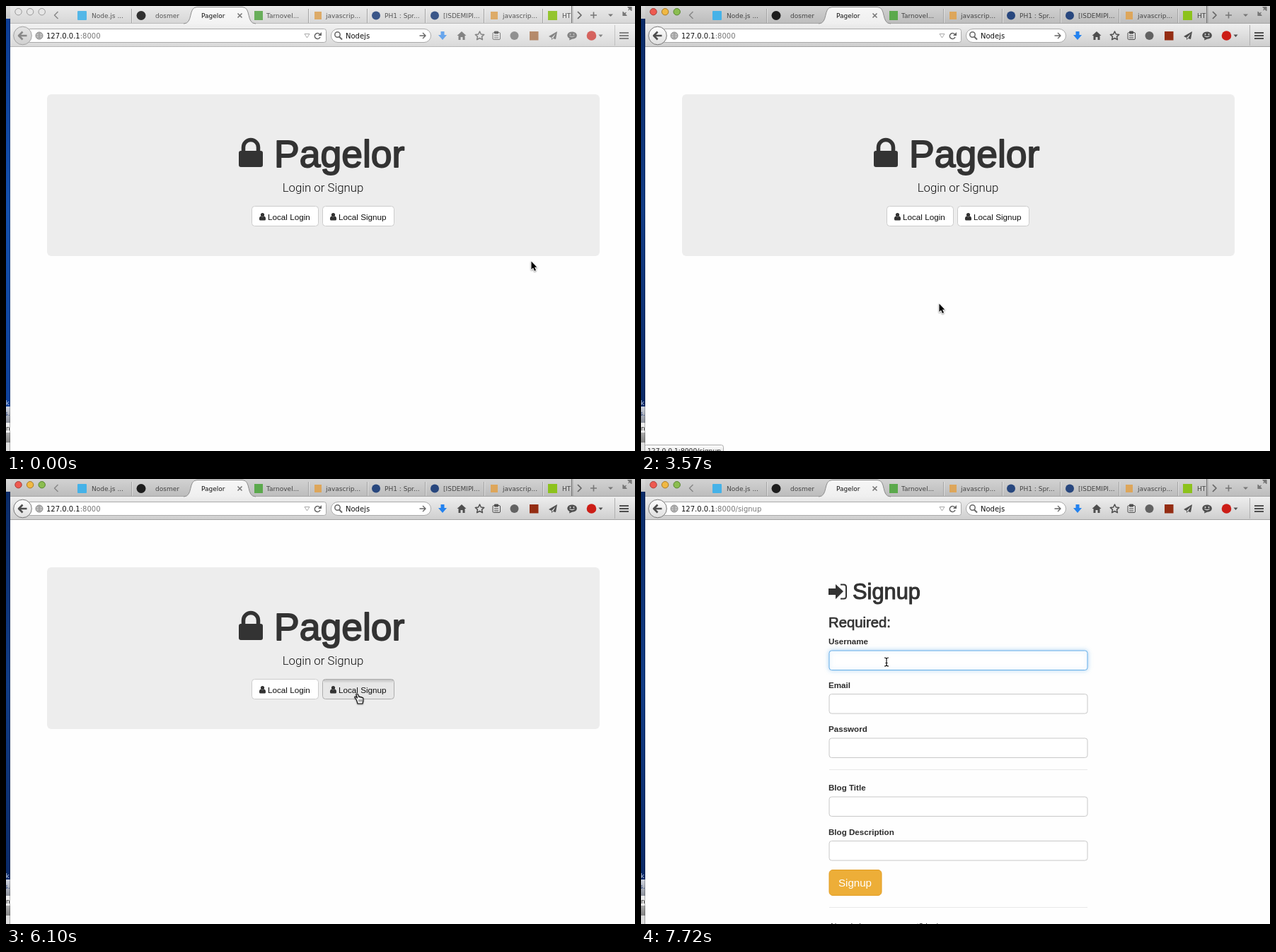
Animation of 889 by 630 pixels, one loop 8 s. Source, as an HTML page with a canvas:

```html
<!DOCTYPE html>
<html lang="en">
<head>
<meta charset="utf-8">
<title>Signup walkthrough</title>
<style>
html, body { margin: 0; width: 100%; height: 100%; overflow: hidden; background: #fefefe; }
canvas { display: block; }
</style>
</head>
<body>
<canvas id="stage" width="889" height="630"></canvas>
<script>
const ctx = document.getElementById('stage').getContext('2d');
const LOOP = 8000;
const UI = '"DejaVu Sans", sans-serif';
const PAGE = '"Liberation Sans", Arial, sans-serif';

// Pointer stops: time, x, y, shape
const POINTER = [
  [0, 742, 361, 'arrow'], [300, 655, 338, 'arrow'], [445, 462, 299, 'arrow'], [590, 401, 294, 'arrow'],
  [1040, 402, 295, 'hand'], [1340, 426, 297, 'hand'], [1480, 476, 300, 'hand'], [1630, 508, 301, 'hand'],
  [3570, 421, 421, 'arrow'], [3720, 410, 452, 'arrow'], [3870, 404, 470, 'arrow'], [4020, 402, 477, 'arrow'],
  [5210, 402, 475, 'arrow'], [5360, 406, 462, 'arrow'], [5500, 421, 428, 'arrow'], [5650, 452, 374, 'arrow'],
  [5800, 484, 328, 'arrow'], [5950, 497, 304, 'hand'], [6240, 496, 303, 'arrow'],
  [6690, 478, 296, 'arrow'], [6840, 428, 278, 'arrow'], [6990, 365, 262, 'beam'], [7130, 347, 259, 'beam']
];

const within = (t, from, to) => t >= from && t < to;

function text(str, x, y, font, color = '#333', align = 'left') {
  ctx.font = font;
  ctx.fillStyle = color;
  ctx.textAlign = align;
  ctx.fillText(str, x, y);
}

// Medium weight: regular letters with a thin outline
function heading(str, x, y, size) {
  text(str, x, y, size + 'px ' + PAGE, '#333');
  ctx.strokeStyle = '#333';
  ctx.lineWidth = size * .034;
  ctx.lineJoin = 'round';
  ctx.strokeText(str, x, y);
}

function rect(x, y, w, h, fill) {
  ctx.fillStyle = fill;
  ctx.fillRect(x, y, w, h);
}

function box(x, y, w, h, r, fill, stroke) {
  ctx.beginPath();
  ctx.roundRect(x, y, w, h, r);
  paint(fill, stroke);
}

function disc(x, y, r, fill, stroke, width) {
  ctx.beginPath();
  ctx.arc(x, y, r, 0, 7);
  paint(fill, stroke, width);
}

function paint(fill, stroke, width = 1) {
  if (fill) { ctx.fillStyle = fill; ctx.fill(); }
  if (stroke) { ctx.strokeStyle = stroke; ctx.lineWidth = width; ctx.stroke(); }
}

function shape(d, x, y, fill, stroke, width = 1) {
  const path = new Path2D(d);
  ctx.save();
  ctx.translate(x, y);
  if (fill) { ctx.fillStyle = fill; ctx.fill(path); }
  if (stroke) { ctx.strokeStyle = stroke; ctx.lineWidth = width; ctx.stroke(path); }
  ctx.restore();
}

function fade(y0, y1, ...colors) {
  const g = ctx.createLinearGradient(0, y0, 0, y1);
  colors.forEach((c, i) => g.addColorStop(i / (colors.length - 1), c));
  return g;
}

function desktop(active) {
  rect(0, 0, 6, 630, active ? fade(20, 560, '#0a2b68', '#113c86', '#0a2a68') : fade(20, 560, '#0b3c94', '#1450ad', '#0d409a'));
  rect(0, 0, 6, 18, fade(0, 18, '#dadada', '#c6c6c6'));
  rect(0, 567, 6, 23, fade(567, 590, '#cfd4df', '#8d929c'));
  rect(0, 590, 6, 14, '#eeeeee');
  rect(0, 604, 6, 14, fade(604, 618, '#aaaaaa', '#858585'));
  rect(0, 618, 6, 12, '#dedede');
  ctx.save();
  ctx.beginPath();
  ctx.rect(0, 550, 6, 60);
  ctx.clip();
  text('ok', -6, 565, '9px ' + UI, '#c5d0e6');
  text('s.', -2, 580, '9px ' + UI, '#223b77');
  text('n', 0, 601, '9px ' + UI, '#222');
  ctx.restore();
  rect(5, 18, 1, 612, 'rgba(0,0,0,.25)');
}

function tabs(active) {
  rect(6, 0, 883, 25, active ? fade(0, 25, '#d2d2d2', '#bcbcbc') : fade(0, 25, '#e9e9e9', '#d6d6d6'));
  const lights = active ? ['#ee5a50', '#f0b843', '#8bbd50'] : ['#e6e6e6', '#e6e6e6', '#e6e6e6'];
  const rims = active ? ['#a83c36', '#a87a26', '#55842c'] : ['#999', '#999', '#999'];
  lights.forEach((c, i) => disc(17.5 + i * 16.6, 8.2, 4.7, c, rims[i]));
  const ink = active ? '#444' : '#555';
  shape('M3 -5L-2 0L3 5', 70.5, 13, null, '#888', 1.5);
  for (const x of [177, 427, 510, 592, 675, 758]) {
    rect(x, 4, 1, 20, '#a4a4a4');
    rect(x + 1, 4, 1, 20, 'rgba(255,255,255,.45)');
  }

  ctx.globalAlpha = active ? 1 : .9;
  box(101, 7, 13, 13, 1, '#45b2e8');
  disc(191, 13.5, 6.5, '#1d1d1d');
  box(351, 7, 12, 13, 0, '#5ba94c');
  box(436, 8, 10, 11, 0, '#dda65b');
  disc(523, 13.5, 6, '#28477e');
  disc(606, 13.5, 6, '#28477e');
  box(685, 8, 10, 11, 0, '#dda65b');
  box(766, 7, 13, 13, 0, '#8cc21c');
  ctx.globalAlpha = 1;

  const label = (s, x) => text(s, x, 16.5, '9px ' + UI, ink);
  label('Node.js ...', 121);
  label('dosmer', 211);
  label('Tarnovel...', 368);
  label('javascrip...', 452);
  label('PH1 : Spr...', 535);
  label('[ISDEMIPI...', 618);
  label('javascrip...', 702);
  ctx.save();
  ctx.beginPath();
  ctx.rect(780, 0, 19, 25);
  ctx.clip();
  label('HTML', 786);
  ctx.restore();
  rect(799, 0, 1, 24, '#777');
  rect(800, 0, 2, 24, 'rgba(0,0,0,.1)');
  shape('M-2.5 -5L2.5 0L-2.5 5', 810.5, 13, null, '#666', 1.7);
  shape('M-4.5 0H4.5M0 -4.5V4.5', 830.5, 13, null, '#777', 1.6);
  shape('M-3.5 -1.5H3.5L0 2Z', 854.5, 13, '#777');
  shape('M7 0H12V5ZM0 7V12H5ZM7.5 4.5L10 2M2 10L4.5 7.5', 872, 1.5, '#777', '#777', 1.2);
}

function toolbar(active, url) {
  rect(6, 24, 883, 34, active ? fade(24, 57, '#efefef', '#cfcfcf') : fade(24, 57, '#f2f2f2', '#dadada'));
  rect(6, 24, 883, 1, active ? '#a5a5a5' : '#bbbbbb');
  rect(6, 57, 883, 1, active ? '#a2a2a2' : '#b8b8b8');
  shape('M251 25C265 25 257 1.5 270 1.5H334C347 1.5 339 25 353 25', 0, 0,
    active ? fade(0, 25, '#f7f7f7', '#efefef') : fade(0, 25, '#fafafa', '#f2f2f2'), '#8c8c8c');
  text('Pagelor', 276, 16.5, '9px ' + UI, '#111');
  shape('M-3 -3L3 3M3 -3L-3 3', 330.5, 13.5, null, '#777', 1.6);

  box(30.5, 32.5, 422, 19, 3, '#fff', '#aaa');
  disc(23.5, 42, 12.8, active ? fade(29, 55, '#fff', '#dedede') : fade(29, 55, '#e4e4e4', '#d0d0d0'), active ? '#777' : '#a2a2a2');
  shape('M6 0H-5M0 -5.5L-5.5 0L0 5.5', 23.5, 42, null, active ? '#4d4d4d' : '#888', 2.6);
  disc(47, 42, 5, '#c5c5c5', '#888');
  shape('M-5 0H5M0 -5V5M-3.5 -3.5Q0 -1 3.5 -3.5M-3.5 3.5Q0 1 3.5 3.5', 47, 42, null, '#8b8b8b', .7);
  text('127.0.0.1', 57, 45.5, '10px ' + UI, '#111');
  const host = ctx.measureText('127.0.0.1').width;
  text(':8000' + url, 57 + host, 45.5, '10px ' + UI, '#777');
  shape('M-3.5 -2.5H3.5L0 3Z', 425.5, 42, null, '#aaa');
  shape('M3.5 -1A4 4 0 1 0 3.5 2', 440.5, 42, null, '#666', 1.5);
  shape('M5.5 -5V0H.5Z', 440.5, 42, '#666');

  box(459.5, 32.5, 141, 19, 9.5, '#fff', '#aaa');
  disc(468.5, 40.5, 3.7, null, '#666', 1.5);
  shape('M0 0L4 4', 471, 43.5, null, '#666', 2);
  text('Nodejs', 480, 45.5, '10px ' + UI, '#111');
  shape('M-4.5 0H4M0 -4L4 0L0 4', 589, 42, null, '#666', 1.4);

  ctx.globalAlpha = active ? 1 : .65;
  const ink = '#4e4e4e';
  shape('M-2.5 -6H2.5V-1H6L0 6L-6 -1H-2.5Z', 617, 42, '#2382ef');
  shape('M-6.5 0L0 -6L6.5 0H4.5V6H1.5V2H-1.5V6H-4.5V0Z', 644, 42, ink);
  shape('M0 -6L1.9 -2L6.2 -1.6L3 1.4L3.9 5.7L0 3.5L-3.9 5.7L-3 1.4L-6.2 -1.6L-1.9 -2Z', 669.5, 42, null, ink, 1.5);
  box(688, 37.5, 10.5, 10, 1.5, null, ink);
  shape('M-2.5 -6H2.5V-3H-2.5ZM-3 0H3M-3 3H3', 693, 42, ink, ink);
  disc(718.5, 42, 6, '#626262');
  box(740, 36, 12.5, 12.5, 0, active ? '#942d13' : '#9c5b2c');
  shape('M6 -6L-6 1L-2 3L4 -3L0 4L4 5ZM-2 3V6L0 4Z', 773, 42, ink);
  shape('M0 -5.5C9 -5.5 9 4.5 1 4.5L-4 6.5L-3.5 4C-9 1 -7 -5.5 0 -5.5Z', 800, 42, ink);
  disc(797.5, 40, .9, '#eee');
  disc(802.5, 40, .9, '#eee');
  shape('M-3.5 1.5Q0 4 3.5 1.5', 800, 41, null, '#eee');
  disc(827.5, 42, 6.8, '#cc1d16');
  shape('M-3 -1.5H3L0 2Z', 840.5, 42, ink);
  rect(860, 27, 1, 29, '#b0b0b0');
  for (const y of [37, 41, 45]) rect(867, y, 13, 2, ink);
  ctx.globalAlpha = 1;
}

function personButton(x, w, label, state) {
  const hot = state !== 'idle';
  box(x + .5, 283.5, w, 28, 4, hot ? '#e7e7e7' : '#fff', hot ? '#adadad' : '#ccc');
  if (state === 'pressed') {
    rect(x + 2, 284, w - 3, 5, fade(284, 289, 'rgba(0,0,0,.16)', 'rgba(0,0,0,0)'));
  }
  disc(x + 15.5, 295.7, 2.6, '#333');
  shape('M-4.5 4.5C-4.7 1 -3.5 0 -2.2 0Q0 1.6 2.2 0C3.5 0 4.7 1 4.5 4.5Q4.3 5.8 3 5.8H-3Q-4.3 5.8 -4.5 4.5Z', x + 15.5, 297.8, '#333');
  text(label, x + 23, 302.5, '11.7px ' + PAGE, '#111');
}

function welcome(t) {
  box(58, 125, 781, 229, 6, '#ededed');
  box(329, 205, 34, 23, 3, '#333');
  shape('M335.5 207V200A10.5 10.5 0 0 1 356.5 200V207', 0, 0, null, '#333', 5.5);
  heading('Pagelor', 379, 228, 53.5);
  text('Login or Signup', 448, 262.5, '300 16.8px Roboto, sans-serif', '#111', 'center');

  const login = within(t, 1040, 1480) ? 'hover' : 'idle';
  const signup = within(t, 6100, 6240) ? 'pressed'
    : within(t, 1480, 3570) || within(t, 5950, 6100) ? 'hover' : 'idle';
  personButton(347, 94, 'Local Login', login);
  personButton(447, 101, 'Local Signup', signup);

  if (within(t, 1040, 3720)) {
    const link = t < 1480 ? 'login' : 'signup';
    box(4.5, 621.5, link === 'login' ? 103 : 112, 14, 3, fade(621, 634, '#fff', '#e0e0e0'), '#aaa');
    text('127.0.0.1:8000/' + link, 9, 632.5, '9.2px ' + UI, '#222');
  }
}

function field(label, y, focus = 0) {
  text(label, 265, y - 8.5, 'bold 11.6px ' + PAGE, '#2b2b2b');
  ctx.save();
  if (focus) {
    ctx.shadowColor = `rgba(102,175,233,${.5 * focus})`;
    ctx.shadowBlur = 6;
  }
  box(266, y + .5, 365, 27.5, 3.5, '#fff', focus ? '#66afe9' : '#c8c8c8');
  ctx.restore();
}

function signupForm(t) {
  shape('M265 155H275V149L286 159L275 170V164H265Z', 0, 0, '#333');
  shape('M282 149.5H286.5Q290 149.5 290 153V166Q290 169.5 286.5 169.5H282', 0, 0, null, '#333', 2);
  heading('Signup', 299, 170, 30.8);
  heading('Required:', 265, 209.5, 20.3);
  field('Username', 242.5, t < 7130 ? 0 : t < 7280 ? .5 : 1);
  field('Email', 304);
  field('Password', 366.5);
  field('Blog Title', 449.5);
  field('Blog Description', 512);
  rect(266, 411, 365, 1, '#e8e8e8');
  rect(266, 606, 365, 1, '#e8e8e8');
  box(266, 553.5, 74, 36, 5, '#edae38', '#e39d22');
  text('Signup', 279, 577, '15.1px ' + PAGE, '#fff');
  text('Already have an account? login', 266, 637, '11.5px ' + PAGE, '#333');
  if (within(t, 7280, 7570)) rect(277, 250, 1, 13, '#222');

  ctx.globalAlpha = t < 7570 ? 1 : t < 7720 ? .5 : 0;
  box(883, 60, 6, 538, 3, '#7d7d7d');
  ctx.globalAlpha = 1;
}

function pointer(t) {
  const [, x, y, kind] = POINTER.findLast(stop => t >= stop[0]);
  if (kind === 'beam') {
    const bar = 'M-3 -6Q0 -6 0 -4Q0 -6 3 -6M0 -4V4M-3 6Q0 6 0 4Q0 6 3 6M-1.5 1.5H1.5';
    shape(bar, x, y, null, 'rgba(255,255,255,.8)', 2.5);
    shape(bar, x, y, null, '#111', 1.2);
    return;
  }
  ctx.save();
  ctx.lineJoin = 'round';
  ctx.shadowColor = 'rgba(0,0,0,.35)';
  ctx.shadowBlur = 2;
  ctx.shadowOffsetY = 1;
  if (kind === 'arrow') {
    const d = 'M.5 .5V12L3 9.5L5 14L7 13L5 8.7H8.3Z';
    shape(d, x, y, '#fff', '#fff', 1.8);
    ctx.shadowColor = 'transparent';
    shape(d, x, y, '#000');
  } else {
    shape('M-1.5 9L-3.5 6Q-5 4.5 -3.5 4Q-2 4 -.5 6L-2 1.5Q-2.5 0 -1 0Q.3 0 1 2L2 4.5Q3 3.5 4 5Q5.5 4 6 5.5Q8 5 8 7.5V10L7 14H0Z',
      x, y, '#fff', '#111', 1.1);
    ctx.shadowColor = 'transparent';
    shape('M2 8V11.5M4 8V11.5M6 8V11.5', x, y, null, '#333', .8);
  }
  ctx.restore();
}

function frame(now) {
  const t = now % LOOP;
  const active = t >= 890;
  const signedUpPage = t >= 6240;
  rect(0, 0, 889, 630, '#fefefe');
  if (signedUpPage) signupForm(t);
  else welcome(t);
  desktop(active);
  tabs(active);
  toolbar(active, signedUpPage ? '/signup' : '');
  pointer(t);
  requestAnimationFrame(frame);
}
requestAnimationFrame(frame);
</script>
</body>
</html>
```
